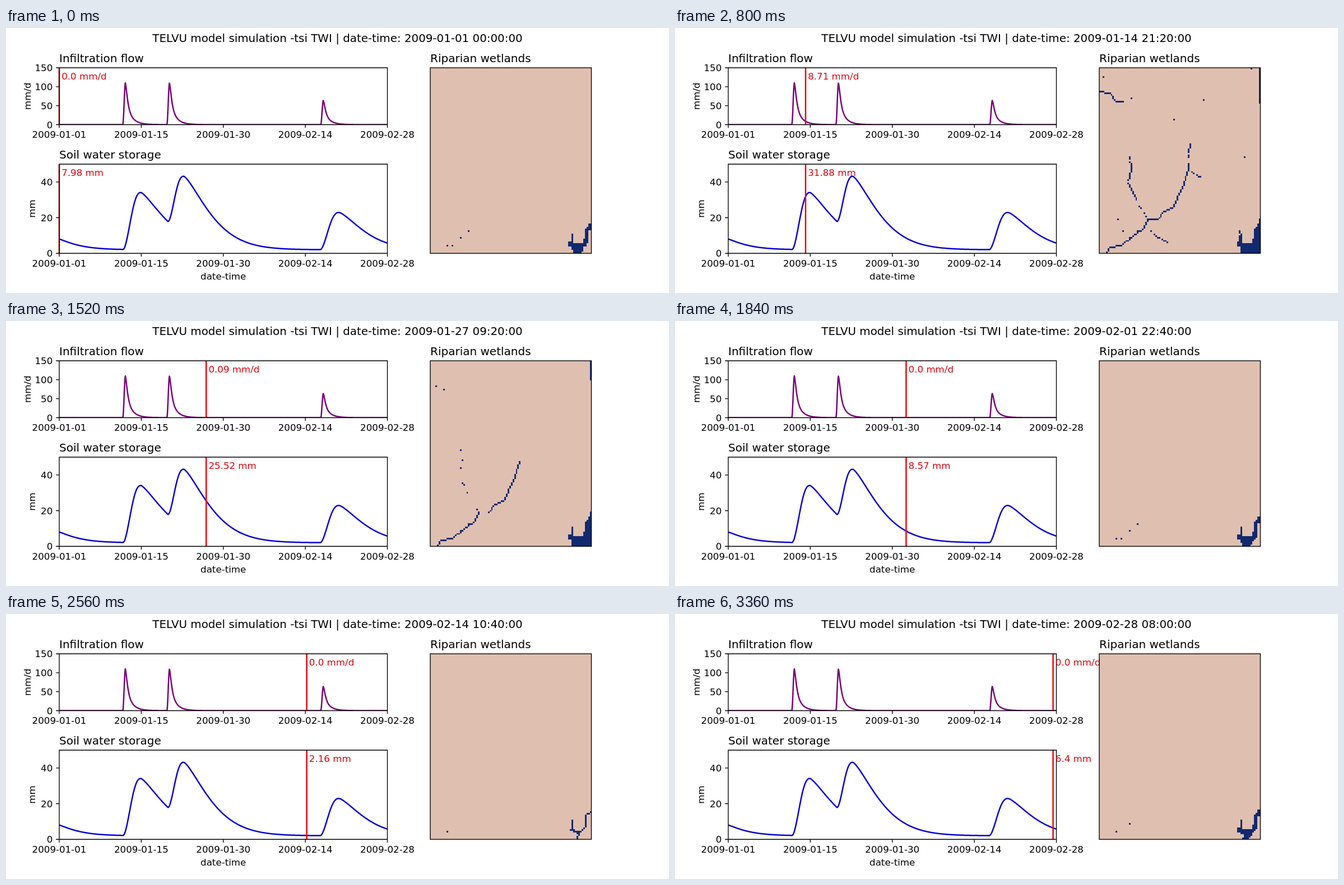
Animation, 1183 px wide and 473 px high, one loop 3.44 s. Source, as an HTML page:

```html
<!DOCTYPE html>
<html lang="en">
<head>
<meta charset="utf-8">
<title>Wetland simulation</title>
<style>
html, body { margin: 0; width: 100%; height: 100%; overflow: hidden; background: #fff; }
svg { display: block; font-family: "DejaVu Sans", sans-serif; font-size: 16.67px; }
.title { font-size: 20px; }
.curve { fill: none; stroke-width: 2.5; stroke-linejoin: round; }
.frame { fill: none; stroke: #000; stroke-width: 1.35; }
.cursor { stroke: #ec0409; stroke-width: 2.5; }
.value { fill: #e0040f; }
</style>
</head>
<body>
<svg id="stage" width="1183" height="473" viewBox="0 0 1183 473"></svg>
<script>
const FRAME_MS = 80, FRAMES = 43, STEP_MS = 2000 * 60000;
const LEFT = 95, RIGHT = 680.5, STEP_X = 13.8;
const stage = document.getElementById("stage");

function add(tag, attrs, text) {
  const node = document.createElementNS("http://www.w3.org/2000/svg", tag);
  for (const key in attrs) node.setAttribute(key, attrs[key]);
  if (text) node.textContent = text;
  stage.appendChild(node);
  return node;
}
const label = (x, y, text, anchor = "start", extra = {}) =>
  add("text", { x, y, "text-anchor": anchor, ...extra }, text);
const smooth = u => u * u * (3 - 2 * u);

// ---- Infiltration: a quick rise, then a fast and a slow decay ----
const pulses = [{ x: 213, mm: 110 }, { x: 291.7, mm: 110 }, { x: 566.2, mm: 64 }];

function infiltration(x) {
  return pulses.reduce((sum, p) => {
    const d = x - p.x, rise = 4.6, fast = d / 2.3;
    if (d < -rise) return sum;
    const shape = d < 0 ? smooth(1 + d / rise)
      : 0.58 * Math.exp(-d / 10) + 0.42 * (1 + fast) * Math.exp(-fast);
    return sum + p.mm * shape;
  }, 0);
}

// ---- Storage: skewed rise to a top, then a stretched exponential recession ----
const BASE = 2.03;

// The recession leaves the top and passes through points a and b.
function recession(top, a, b) {
  const fall = p => Math.log((top[1] - BASE) / (p[1] - BASE));
  const da = a[0] - top[0], db = b[0] - top[0];
  const power = Math.log(fall(b) / fall(a)) / Math.log(db / da);
  return x => BASE + (top[1] - BASE) * Math.exp(-fall(a) * ((x - top[0]) / da) ** power);
}
const phases = [
  { start: 95, top: [95, 7.98], a: [125, 4.87], b: [208, 2.2] },
  { start: 208.8, top: [240.88, 34.1], a: [262, 27.3], b: [290.5, 17.4] },
  { start: 289, top: [317.2, 43.2], a: [357.2, 25.52], b: [467.6, 3.35] },
  { start: 560.5, top: [594.3, 22.9], a: [633.2, 13.84], b: [674.6, 6.4] }
];
for (const p of phases) p.fall = recession(p.top, p.a, p.b);

function storage(x) {
  const i = phases.findLastIndex(p => x >= p.start);
  const { start, top, fall } = phases[i];
  if (x >= top[0]) return fall(x);
  const low = phases[i - 1].fall(start), u = (x - start) / (top[0] - start);
  return low + (top[1] - low) * smooth(1 - (1 - u) ** 1.3);
}

// ---- Charts ----
const dates = ["2009-01-01", "2009-01-15", "2009-01-30", "2009-02-14", "2009-02-28"];

function chart({ top, bottom, max, step, name, unit, unitX, series, color }) {
  const toY = v => bottom - v * (bottom - top) / max;
  const id = "clip" + top;
  const clip = add("clipPath", { id });
  clip.appendChild(add("rect", { x: LEFT, y: top, width: RIGHT - LEFT, height: bottom - top }));
  let d = "";
  for (let x = LEFT; x <= RIGHT; x += 0.5) {
    d += (d ? "L" : "M") + x + " " + toY(series(x)).toFixed(2);
  }
  add("path", { d, class: "curve", stroke: color, "clip-path": `url(#${id})` });
  const cursor = add("line", { y1: top, y2: bottom, class: "cursor" });
  let marks = `M${LEFT} ${top}H${RIGHT}V${bottom}H${LEFT}Z`;
  dates.forEach((date, i) => {
    const x = LEFT + i * (RIGHT - LEFT) / 4;
    marks += `M${x} ${bottom}v5.8`;
    label(x, bottom + 23.7, date, "middle");
  });
  for (let v = 0; v <= max; v += step) {
    marks += `M${LEFT} ${toY(v)}h-5.8`;
    label(83.3, toY(v) + 6, v + "", "end");
  }
  add("path", { d: marks, class: "frame" });
  label(LEFT, top - 10.2, name, "start", { class: "title" });
  const mid = (top + bottom) / 2;
  label(unitX, mid, unit, "middle", { transform: `rotate(-90 ${unitX} ${mid})` });
  const value = label(0, top + 20.5, "", "start", { class: "value" });
  return x => {
    cursor.setAttribute("x1", x);
    cursor.setAttribute("x2", x);
    const n = +series(x).toFixed(2);
    value.setAttribute("x", x + 4.2);
    value.textContent = (Number.isInteger(n) ? n.toFixed(1) : n) + " " + unit;
  };
}

const charts = [
  chart({ top: 71, bottom: 172.5, max: 150, step: 50, name: "Infiltration flow",
    unit: "mm/d", unitX: 43.9, series: infiltration, color: "#780078" }),
  chart({ top: 243, bottom: 402.2, max: 50, step: 20, name: "Soil water storage",
    unit: "mm", unitX: 52.4, series: storage, color: "#0500da" })
];
label(387.7, 448.8, "date-time", "middle");
const heading = label(591.5, 24.6, "", "middle", { "font-size": 19.85 });

// ---- Map: each cell floods once storage passes its threshold ----
const MAP = { x: 757, y: 71, w: 287.5, h: 331, cols: 98, rows: 113 };
const cells = new Map();
const parse = text => text.split(",").map(part => part.trim().split(" ").map(Number));
const noise = (c, r) => Math.abs(Math.sin(c * 12.99 + r * 78.23) * 43758.55) % 1;

function wet(c, r, level) {
  const key = r * MAP.cols + c;
  cells.set(key, Math.min(level, cells.get(key) ?? Infinity));
}

// Visits every cell along a polyline of "col row" points, with progress 0..1.
function trace(path, visit) {
  const pts = parse(path);
  for (let i = 1; i < pts.length; i++) {
    const [c0, r0] = pts[i - 1], [c1, r1] = pts[i];
    const n = Math.max(Math.abs(c1 - c0), Math.abs(r1 - r0));
    for (let k = 0; k <= n; k++) {
      const u = k / n;
      visit(Math.round(c0 + (c1 - c0) * u), Math.round(r0 + (r1 - r0) * u), (i - 1 + u) / (pts.length - 1));
    }
  }
}

// Thresholds run from lo to hi; a few cells flood early, a share "gap" only at the peak.
function stream(path, lo, hi, early = 0, gap = 0) {
  trace(path, (c, r, t) => {
    const n = noise(c, r);
    wet(c, r, n < gap ? 36 : (lo + (hi - lo) * t) * (1 - early * n ** 4));
  });
}

// The lake spreads outward from its bed.
function lake() {
  const bed = [];
  const dig = path => trace(path, (c, r) => bed.push([c, r]));
  dig("86 101, 86 107, 89 109, 92 107, 94 105, 94 98, 97 96");
  dig("85 107, 90 108, 89 112");
  for (let r = 92; r < MAP.rows; r++) {
    for (let c = 84; c < MAP.cols; c++) {
      const d = Math.min(...bed.map(([bc, br]) => Math.hypot(bc - c, br - r)));
      const ear = c < 86 && r >= 106 && r <= 108;
      const basin = c >= 86 && r >= 107, slope = c >= 97 - (r - 92) / 3;
      if (d === 0) wet(c, r, 0);
      else if (ear || basin) wet(c, r, Math.min(2 + 3.5 * Math.max(0, d - 0.9) + 2 * noise(c, r) * (d > 1), 24));
      else if (slope) wet(c, r, Math.min(2 + 6 * Math.max(0, d - 0.9), r < 97 ? 31 : 24));
    }
  }
}
lake();

stream("4 112, 6 109, 13 108, 20 102, 26 98, 29 92", 18, 24, 0.5);
stream("35 92, 38 88, 45 84, 48 76, 51 70, 54 61", 19, 25, 0.2);
stream("29 92, 35 92", 28, 30);
stream("54 61, 54 52, 55 45", 27, 31, 0, 0.25);
stream("28 90, 25 85, 20 76, 17 69, 19 62, 18 54", 26, 31, 0.2, 0.2);
stream("31 99, 34 102, 41 106", 29, 31, 0, 0.4);
stream("56 63, 58 65, 61 66", 28, 30, 0, 0.2);
stream("0 14, 6 15, 10 20, 14 20", 27, 29, 0.3);
stream("97 0, 97 21", 20, 30);
stream("85 97, 85 105", 27, 30, 0, 0.2);

// Springs by the main stream wake one by one; lone pools come late.
parse("10 108, 18 103, 13 108, 23 99").forEach(([c, r], i) => wet(c, r, 8 - 6 / 2 ** i));
parse("45 31, 63 19, 88 54, 92 0, 2 5, 19 18, 14 99, 11 92").forEach(([c, r]) => wet(c, r, 30));

add("rect", { x: MAP.x, y: MAP.y, width: MAP.w, height: MAP.h, fill: "#dfbfb0" });
const water = add("path", { fill: "#11296f", "shape-rendering": "crispEdges" });
add("rect", { x: MAP.x, y: MAP.y, width: MAP.w, height: MAP.h + 0.2, class: "frame" });
label(757, 60.8, "Riparian wetlands", "start", { class: "title" });

function drawWater(level) {
  const edgeX = c => Math.round(MAP.x + c * MAP.w / MAP.cols);
  const edgeY = r => Math.round(MAP.y + r * MAP.h / MAP.rows);
  let d = "";
  for (const [key, threshold] of cells) {
    if (threshold > level) continue;
    const c = key % MAP.cols, r = Math.floor(key / MAP.cols);
    d += `M${edgeX(c)} ${edgeY(r)}H${edgeX(c + 1)}V${edgeY(r + 1)}H${edgeX(c)}Z`;
  }
  water.setAttribute("d", d);
}

// ---- Playback ----
let shown = -1;
function draw(ms) {
  const k = Math.floor(ms / FRAME_MS) % FRAMES;
  if (k === shown) return;
  shown = k;
  const x = LEFT + k * STEP_X;
  const stamp = new Date(Date.UTC(2009, 0, 1) + k * STEP_MS).toISOString();
  heading.textContent = "TELVU model simulation -tsi TWI | date-time: " + stamp.slice(0, 19).replace("T", " ");
  charts.forEach(update => update(x));
  drawWater(storage(x));
}
const start = performance.now();
function tick() {
  draw(performance.now() - start);
  requestAnimationFrame(tick);
}
tick();
</script>
</body>
</html>
```
